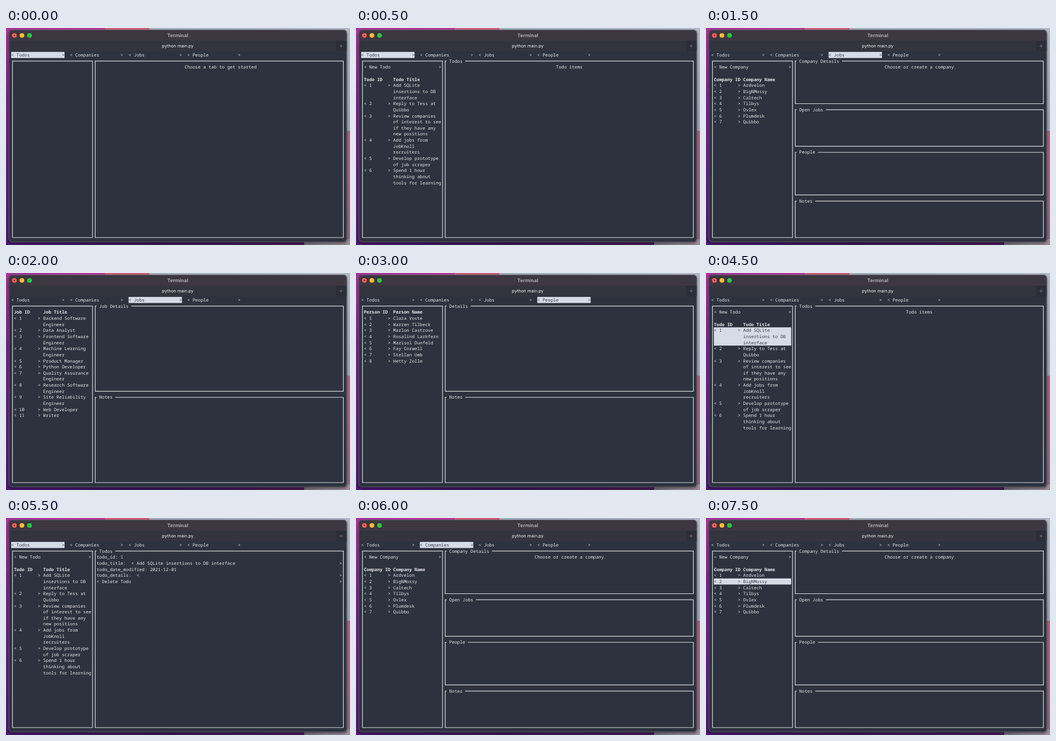
An HTML page with a canvas for the animation above (8 s loop, 600x380 px).

```html
<!DOCTYPE html>
<html lang="en">
<head>
<meta charset="utf-8">
<title>Terminal</title>
<style>
  html, body { margin: 0; width: 100%; height: 100%; overflow: hidden; background: #2d333e; }
  canvas { display: block; width: 600px; height: 380px; }
</style>
</head>
<body>
<canvas id="stage"></canvas>
<script>
const LOOP = 8000, STEP = 500;
const W = 600, H = 380;
const CW = 4.654, RH = 10.66, LEFT = 9, TOP = 41.87;
const FG = '#e3e6ea', BG = '#2d333e', HILITE = '#d6dce6';
const MONO = '"Noto Sans Mono", "DejaVu Sans Mono", monospace';
const SANS = 'Inter, Roboto, sans-serif';

const canvas = document.getElementById('stage');
const scale = window.devicePixelRatio || 1;
canvas.width = W * scale;
canvas.height = H * scale;
const ctx = canvas.getContext('2d');

const tabs = ['Todos', 'Companies', 'Jobs', 'People'];

const lists = {
  todos: {
    add: 'New Todo', head: ['Todo ID', 'Todo Title'],
    items: [
      'Add SQLite insertions to DB interface',
      'Reply to Tess at Quibbo',
      'Review companies of interest to see if they have any new positions',
      'Add jobs from JobKnoll recruiters',
      'Develop prototype of job scraper',
      'Spend 1 hour thinking about tools for learning'
    ]
  },
  companies: {
    add: 'New Company', head: ['Company ID', 'Company Name'],
    items: ['Ardvelon', 'BigNMossy', 'Caltech', 'Tilbys', 'Ovlex', 'Plumdesk', 'Quibbo']
  },
  jobs: {
    head: ['Job ID', 'Job Title'],
    items: [
      'Backend Software Engineer', 'Data Analyst', 'Frontend Software Engineer',
      'Machine Learning Engineer', 'Product Manager', 'Python Developer',
      'Quality Assurance Engineer', 'Research Software Engineer',
      'Site Reliability Engineer', 'Web Developer', 'Writer'
    ]
  },
  people: {
    head: ['Person ID', 'Person Name'],
    items: ['Clara Voste', 'Warren Tilbeck', 'Marlon Castrove', 'Rosalind Larkfern',
      'Marisol Dunfeld', 'Fay Corwell', 'Stellan Umb', 'Hetty Zolle']
  }
};

// Panes on the right: [title, first row, last row]
const panes = {
  start: [['', 1, 30]],
  todos: [['Todos', 1, 30]],
  companies: [['Company Details', 1, 8], ['Open Jobs', 9, 15], ['People', 16, 23], ['Notes', 24, 30]],
  jobs: [['Job Details', 1, 15], ['Notes', 16, 30]],
  people: [['Details', 1, 15], ['Notes', 16, 30]]
};

const hints = {
  start: 'Choose a tab to get started',
  todos: 'Todo items',
  companies: 'Choose or create a company.'
};

// One entry per step; item 0 is the "New" button
const steps = [
  { view: 'start', tab: 0 },
  { view: 'todos', tab: 0 },
  { view: 'companies', tab: 1 },
  { view: 'companies', tab: 2 },
  { view: 'jobs', tab: 2 },
  { view: 'jobs', tab: 3 },
  { view: 'people', tab: 3 },
  { view: 'people', tab: 0 },
  { view: 'todos', tab: 0 },
  { view: 'todos', item: 1 },
  { view: 'todos', item: 1, open: true },
  { view: 'todos', tab: 0, open: true },
  { view: 'companies', tab: 1 },
  { view: 'companies', item: 0 },
  { view: 'companies', item: 1 },
  { view: 'companies', item: 2 }
];

const colX = c => LEFT + c * CW;
const rowY = r => TOP + r * RH;
const midX = c => colX(c + 0.5);
const midY = r => rowY(r + 0.5);

function rect(x, y, w, h, fill) {
  ctx.fillStyle = fill;
  ctx.fillRect(x, y, w, h);
}

function disc(x, y, r, fill) {
  ctx.fillStyle = fill;
  ctx.beginPath();
  ctx.arc(x, y, r, 0, Math.PI * 2);
  ctx.fill();
}

function ramp(x0, y0, x1, y1, ...colors) {
  const g = ctx.createLinearGradient(x0, y0, x1, y1);
  colors.forEach((c, i) => g.addColorStop(i / (colors.length - 1), c));
  return g;
}

function print(col, row, str, { bold = false, color = FG } = {}) {
  ctx.font = `${bold ? 700 : 400} 7.757px ${MONO}`;
  ctx.textAlign = 'left';
  ctx.fillStyle = color;
  ctx.fillText(str, colX(col), midY(row) + 2.7);
}

function label(str, x, y, size, weight, color) {
  ctx.font = `${weight} ${size}px ${SANS}`;
  ctx.textAlign = 'center';
  ctx.fillStyle = color;
  ctx.fillText(str, x, y);
}

// "< text    >" filling the columns from a to b
function button(a, b, row, str, lit) {
  const color = lit ? '#343b47' : FG;
  if (lit) rect(colX(a), rowY(row), (b - a + 1) * CW, RH, HILITE);
  print(a, row, '< ' + str, { color });
  print(b, row, '>', { color });
}

function wrap(str, width) {
  const lines = [''];
  for (const word of str.split(' ')) {
    const last = lines.length - 1;
    const next = lines[last] ? lines[last] + ' ' + word : word;
    if (next.length <= width) lines[last] = next;
    else lines.push(word);
  }
  return lines;
}

function frame(a, b, top, bottom, title = '') {
  const x0 = midX(a), x1 = midX(b), y0 = midY(top), y1 = midY(bottom);
  ctx.strokeStyle = '#d5d8dd';
  ctx.lineWidth = 1.2;
  ctx.beginPath();
  if (title) {
    ctx.moveTo(colX(a + 3 + title.length), y0);
    ctx.lineTo(x1, y0);
    ctx.lineTo(x1, y1);
    ctx.lineTo(x0, y1);
    ctx.lineTo(x0, y0);
    ctx.lineTo(colX(a + 1), y0);
  } else {
    ctx.rect(x0, y0, x1 - x0, y1 - y0);
  }
  ctx.stroke();
  if (title) print(a + 2, top, title);
}

function desktop() {
  rect(0, 0, W, H, ramp(0, 0, 0, H, '#b2359b', '#84219a', '#6a1d8c', '#541a78'));
  rect(0, 0, 180, 6, ramp(0, 0, 180, 0, '#a8329d', '#bd3a98'));
  rect(172, 0, 78, 6, '#cf5f7c');
  rect(250, 0, 350, 6, ramp(250, 0, 600, 0, '#a4b2bf', '#b3bac8'));
  rect(590, 0, 10, 180, ramp(0, 0, 0, 180, '#b3bac8', '#a3a6b8'));
  rect(590, 180, 10, 200, ramp(0, 180, 0, 380, '#b9607f', '#b0627f', '#94687e'));
  rect(0, 370, 520, 10, ramp(0, 0, 520, 0, '#4c1a72', '#3c1a58', '#4a1c58'));
  rect(520, 370, 80, 10, ramp(520, 0, 600, 0, '#77747e', '#8d8a94', '#a08a98'));
}

function chrome() {
  ctx.save();
  ctx.beginPath();
  ctx.roundRect(4.5, 3, 590, 372, 6);
  ctx.shadowColor = 'rgba(0,0,0,.5)';
  ctx.shadowBlur = 5 * scale;
  ctx.shadowOffsetY = 2 * scale;
  ctx.fillStyle = BG;
  ctx.fill();
  ctx.shadowColor = 'transparent';
  ctx.clip();
  rect(4, 3, 591, 19.5, '#3c3741');
  rect(4, 22.5, 591, 18, '#34343e');
  rect(576, 22.5, 19, 18, '#2b2d37');
  ctx.restore();

  ctx.strokeStyle = 'rgba(150,150,162,.55)';
  ctx.lineWidth = 0.8;
  ctx.beginPath();
  ctx.roundRect(4.9, 3.4, 589.2, 371.2, 6);
  ctx.stroke();

  ['#ff5f57', '#febc2e', '#28c840'].forEach((c, i) => disc(14.6 + 13.2 * i, 13, 4.1, c));
  disc(14.6, 13, 1.2, '#7c1f1a');
  label('Terminal', 299.5, 16, 8.6, 700, '#aaa8ae');
  label('python main.py', 299.5, 34.2, 7.6, 400, '#f0f0f2');
  rect(581.5, 31.1, 6, 0.8, '#7d7e87');
  rect(584.1, 28.5, 0.8, 6, '#7d7e87');
}

function sidebar(list, item) {
  let row = 2;
  if (list.add) {
    button(1, 29, row, list.add, item === 0);
    row += 2;
  }
  print(1, row, list.head[0], { bold: true });
  print(12, row++, list.head[1], { bold: true });
  list.items.forEach((text, i) => {
    const lines = wrap(text, 18);
    const lit = item === i + 1;
    const color = lit ? '#343b47' : FG;
    if (lit) rect(colX(1), rowY(row), 29 * CW, RH * lines.length, HILITE);
    print(1, row, '< ' + (i + 1), { color });
    print(10, row, '>', { color });
    for (const line of lines) print(12, row++, line, { color });
  });
}

function todoDetails() {
  print(32, 2, 'todo_id: 1');
  print(32, 3, 'todo_title:');
  button(45, 123, 3, lists.todos.items[0]);
  print(32, 4, 'todo_date_modified: 2021-12-01');
  print(32, 5, 'todo_details:');
  button(47, 123, 5, '');
  button(32, 123, 6, 'Delete Todo');
}

function draw({ view, tab, item, open }) {
  ctx.setTransform(scale, 0, 0, scale, 0, 0);
  ctx.textRendering = 'geometricPrecision';
  desktop();
  chrome();
  tabs.forEach((name, i) => button(i * 22, i * 22 + 19, 0, name, i === tab));
  frame(0, 30, 1, 30);
  for (const [title, top, bottom] of panes[view]) frame(31, 124, top, bottom, title);
  if (lists[view]) sidebar(lists[view], item);
  if (open) {
    todoDetails();
  } else if (hints[view]) {
    const hint = hints[view];
    print(32 + Math.round((92 - hint.length) / 2), 2, hint);
  }
}

const begin = performance.now();
function tick() {
  const t = (performance.now() - begin) % LOOP;
  draw(steps[Math.floor(t / STEP)]);
  requestAnimationFrame(tick);
}
tick();
</script>
</body>
</html>
```
